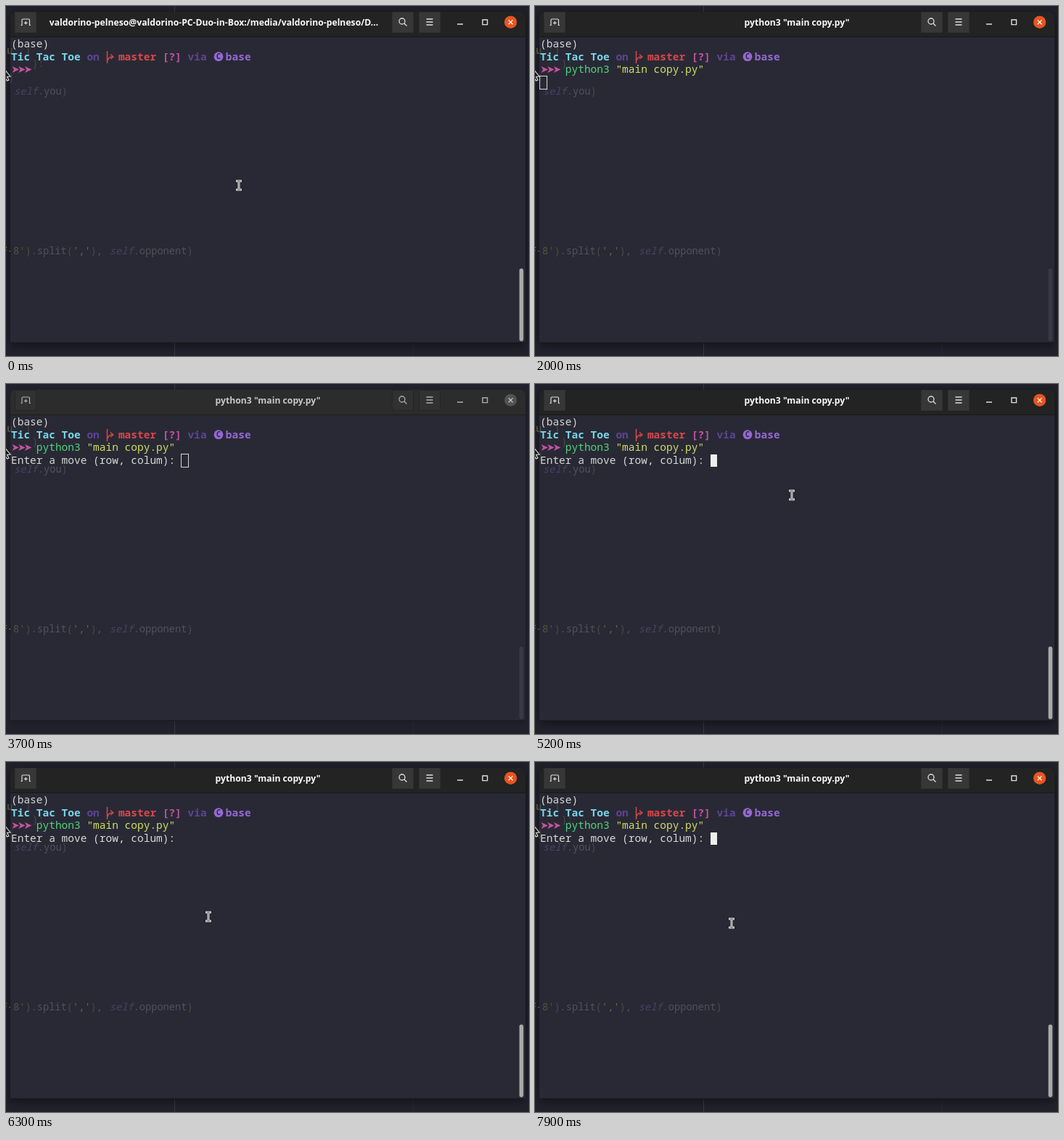
Write an HTML page with a canvas that moves like this. It is 721x482 px and loops after 8 s.

```html
<!DOCTYPE html>
<html lang="en">
<head>
<meta charset="utf-8">
<title>Terminal session</title>
<style>
html, body { margin: 0; width: 100%; height: 100%; overflow: hidden; background: #1d1d26; }
canvas { display: block; }
</style>
</head>
<body>
<canvas id="stage" width="721" height="482"></canvas>
<script>
const ctx = document.getElementById('stage').getContext('2d');
const LOOP = 8000, COL = 8.7, LEFT = 7;
const MONO = '"Noto Sans Mono", "DejaVu Sans Mono", monospace';
const TERM = '14.5px ' + MONO, BOLD = 'bold ' + TERM;
const CODE = '13.67px ' + MONO, CODE_COL = 8.2;
const LONG_TITLE = 'valdorino-pelneso@valdorino-PC-Duo-in-Box:/media/valdorino-pelneso/D...';
const COMMAND_TITLE = 'python3 "main copy.py"';

// When things happen, in ms
const RECALL = 200, RUN = 500, BLUR = 1900, ASK = 3000, POINTER_IN = 4800, FOCUS = 5200;

// Pointer stops: time, x, y
const POINTER = [
  [4800, 108, 198], [4900, 245, 172], [5000, 354, 153], [5300, 354, 153],
  [5700, 310, 190], [6100, 279, 213], [6500, 279, 213], [7000, 271, 222], [LOOP, 271, 222]
];

const clamp = v => Math.max(0, Math.min(1, v));
const col = n => LEFT + n * COL;
const row = n => 57 + n * 17.5;

function rect(x, y, w, h, color, radius = 0) {
  ctx.fillStyle = color;
  ctx.beginPath();
  ctx.roundRect(x, y, w, h, radius);
  ctx.fill();
}

function disc(x, y, r, color) {
  ctx.fillStyle = color;
  ctx.beginPath();
  ctx.arc(x, y, r, 0, 7);
  ctx.fill();
}

function stroke(path, color, width = 1) {
  ctx.strokeStyle = color;
  ctx.lineWidth = width;
  ctx.stroke(new Path2D(path));
}

function text(s, x, y, color, font = TERM) {
  ctx.font = font;
  ctx.fillStyle = color;
  ctx.fillText(s, x, y);
}

function backdrop() {
  rect(0, 0, 721, 482, '#22222d');
  rect(232, 0, 1, 482, '#3a3a46');
  rect(561, 464, 1, 18, '#292934');
  text('lu', -7, 66, '#8a9452', CODE);
  text('F-', -6, 341.5, '#8d8f4c', CODE);
}

function windowBody(focus) {
  ctx.save();
  ctx.shadowColor = `rgba(0,0,0,${.2 + .3 * focus})`;
  ctx.shadowBlur = 14;
  ctx.shadowOffsetY = 3;
  rect(6, 8, 710, 456, '#191921', [7, 7, 0, 0]);
  ctx.restore();
  rect(6, 43, 710, 420, '#292935');
}

function ghostCode() {
  const dim = '#51515c', olive = '#4b4a40', violet = '#4a4163';
  const italic = 'italic ' + CODE;
  text('u', 1, 66, '#4d5140', CODE);
  text("')", 18, 66, '#4a4b45', CODE);
  text('):', 36, 84, '#4a4a45', CODE);
  text(')', 3, 103, '#424039', CODE);
  text('self', 11, 121.5, violet, italic);
  text('.you', 11 + 4 * CODE_COL, 121.5, dim, CODE);
  text(')', 11 + 8 * CODE_COL, 121.5, olive, CODE);
  const code = (s, n, color, font = CODE) => text(s, 10 + n * CODE_COL, 341.5, color, font);
  code("8'", 0, '#53563f');
  code(')', 2, olive);
  code('.split', 3, dim);
  code('(', 9, olive);
  code("','", 10, '#63664a');
  code(')', 13, olive);
  code(',', 14, dim);
  code('self', 16.2, violet, italic);
  code('.opponent', 20.2, dim);
  code(')', 29.2, olive);
}

function header(t, focus) {
  const grey = (on, off) => {
    const v = Math.round(off + (on - off) * focus);
    return `rgb(${v},${v},${v})`;
  };
  const icon = grey(222, 175);
  rect(6, 8, 710, 35, grey(35, 44), [7, 7, 0, 0]);
  rect(6, 42, 710, 1, grey(24, 30));
  for (const x of [12, 532, 569]) {
    rect(x, 8, 30, 29, grey(55, 49), 4);
    ctx.strokeStyle = grey(47, 37);
    ctx.lineWidth = 1;
    ctx.strokeRect(x + .5, 8.5, 29, 28);
  }
  // New tab
  stroke('M20.5 26.5H22V19.5Q22 18 23.5 18H31Q32.5 18 32.5 19.5V26.5H34', icon, 1.2);
  stroke('M27.3 21V25.6M25 23.3H29.6', icon, 1.2);
  // Search
  stroke('M550 21a4 4 0 1 1-8 0a4 4 0 1 1 8 0M549 24l3.5 3.5', icon, 1.3);
  // Menu
  stroke('M579.5 18H588.5M579.5 22H588.5M579.5 26H588.5', icon, 1.3);
  // Minimise, maximise, close
  stroke('M622 25H630', icon, 1.5);
  stroke('M657 19H663.6V25.6H657Z', icon, 1.4);
  disc(695.7, 22.3, 8.5, grey(110, 82));
  ctx.globalAlpha = focus;
  disc(695.7, 22.3, 8.5, '#e9541f');
  ctx.globalAlpha = 1;
  stroke('M692.8 19.4L698.6 25.2M698.6 19.4L692.8 25.2', grey(250, 200), 1.3);

  const running = t >= RUN;
  ctx.textAlign = 'center';
  text(running ? COMMAND_TITLE : LONG_TITLE, running ? 361 : 286.5, 26.8,
    grey(250, 200), 'bold 12.2px "Open Sans", "Noto Sans", sans-serif');
  ctx.textAlign = 'left';
}

function prompt() {
  const cyan = '#79d7ea', violet = '#5d4494', red = '#d8484a', pink = '#c4529f', purple = '#9668d5';
  text('(base)', col(0), row(0), '#d8d8d6');
  text('Tic Tac Toe', col(0), row(1), cyan, BOLD);
  text('on', col(12), row(1), violet, BOLD);
  text('master', col(17), row(1), red, BOLD);
  text('[?]', col(24), row(1), pink, BOLD);
  text('via', col(28), row(1), violet, BOLD);
  text('base', col(34), row(1), purple, BOLD);
  // Branch symbol
  stroke('M139.5 62V79M140 75Q141 70 147 70', red, 1.5);
  stroke('M144 66.5L148 70L144 73', red, 1.3);
  // Circled letter
  disc(293, 69.7, 6.4, purple);
  ctx.textAlign = 'center';
  text('C', 293, 73.4, '#292935', 'bold 10px ' + MONO);
  ctx.textAlign = 'left';
  ctx.fillStyle = pink;
  for (let i = 0; i < 3; i++) {
    const x = 8.5 + i * COL;
    ctx.fill(new Path2D(`M${x} 83L${x + 9.5} 87.5L${x} 92L${x + 2.5} 87.5Z`));
  }
}

function caret(t, focused) {
  const [c, r] = t >= ASK ? [27, 3] : t >= RUN ? [0, 3] : t >= RECALL ? [26, 2] : [4, 2];
  const x = Math.round(col(c)), y = Math.round(row(r) - 13);
  if (!focused) {
    ctx.strokeStyle = '#d6d6d4';
    ctx.lineWidth = 1;
    ctx.strokeRect(x - .5, y - .5, 10, 18);
    return;
  }
  // Each key press or focus restarts the blink
  const start = t >= FOCUS ? FOCUS : t >= RUN ? RUN : t >= RECALL ? RECALL : 100;
  const visible = t >= start && (t - start) % 1200 < 600;
  if (visible) rect(x, y, 9, 17, '#eeeeec');
}

function pointerAt(t) {
  if (t < RECALL) return [321, 247];
  if (t < POINTER_IN) return null;
  const i = POINTER.findIndex(p => p[0] > t);
  const [t0, x0, y0] = POINTER[i - 1], [t1, x1, y1] = POINTER[i];
  const f = (t - t0) / (t1 - t0);
  return [x0 + (x1 - x0) * f, y0 + (y1 - y0) * f];
}

function beam(x, y) {
  ctx.save();
  ctx.translate(Math.round(x), Math.round(y));
  const shape = 'M-2.5 -6H2.5M-2.5 6H2.5M0 -6V6';
  ctx.lineCap = 'square';
  stroke(shape, '#1b1b22', 4.6);
  stroke(shape, '#e2e2e2', 3);
  stroke(shape, '#55555c', .8);
  ctx.restore();
}

function arrow() {
  const path = new Path2D('M-3 86L6 97L1.5 97.5L4 102L1.5 103L-1 98.5L-3 100Z');
  ctx.fillStyle = '#17171c';
  ctx.fill(path);
  ctx.strokeStyle = '#e4e4e4';
  ctx.lineWidth = 1.1;
  ctx.stroke(path);
}

function draw(t) {
  const focused = t < BLUR || t >= FOCUS;
  const glow = t >= FOCUS ? 1 : 1 - clamp((t - 2000) / 300);
  backdrop();
  windowBody(glow);
  header(t, glow);
  rect(561, 43, 1, 420, '#272732');
  ghostCode();
  prompt();
  if (t >= RECALL) {
    text('python3', col(4), row(2), '#4fd47c');
    text('"main copy.py"', col(12), row(2), '#d2df62');
  }
  if (t >= ASK) text('Enter a move (row, colum):', col(0), row(3), '#d8d8d6');
  caret(t, focused);
  rect(707.7, 361.5, 5.6, 100, focused ? '#a9a9a8' : '#383847', 2.8);
  arrow();
  const pos = pointerAt(t);
  if (pos) beam(...pos);
}

function tick() {
  draw(Math.floor(performance.now() % LOOP / 100) * 100);
  requestAnimationFrame(tick);
}
tick();
</script>
</body>
</html>
```
